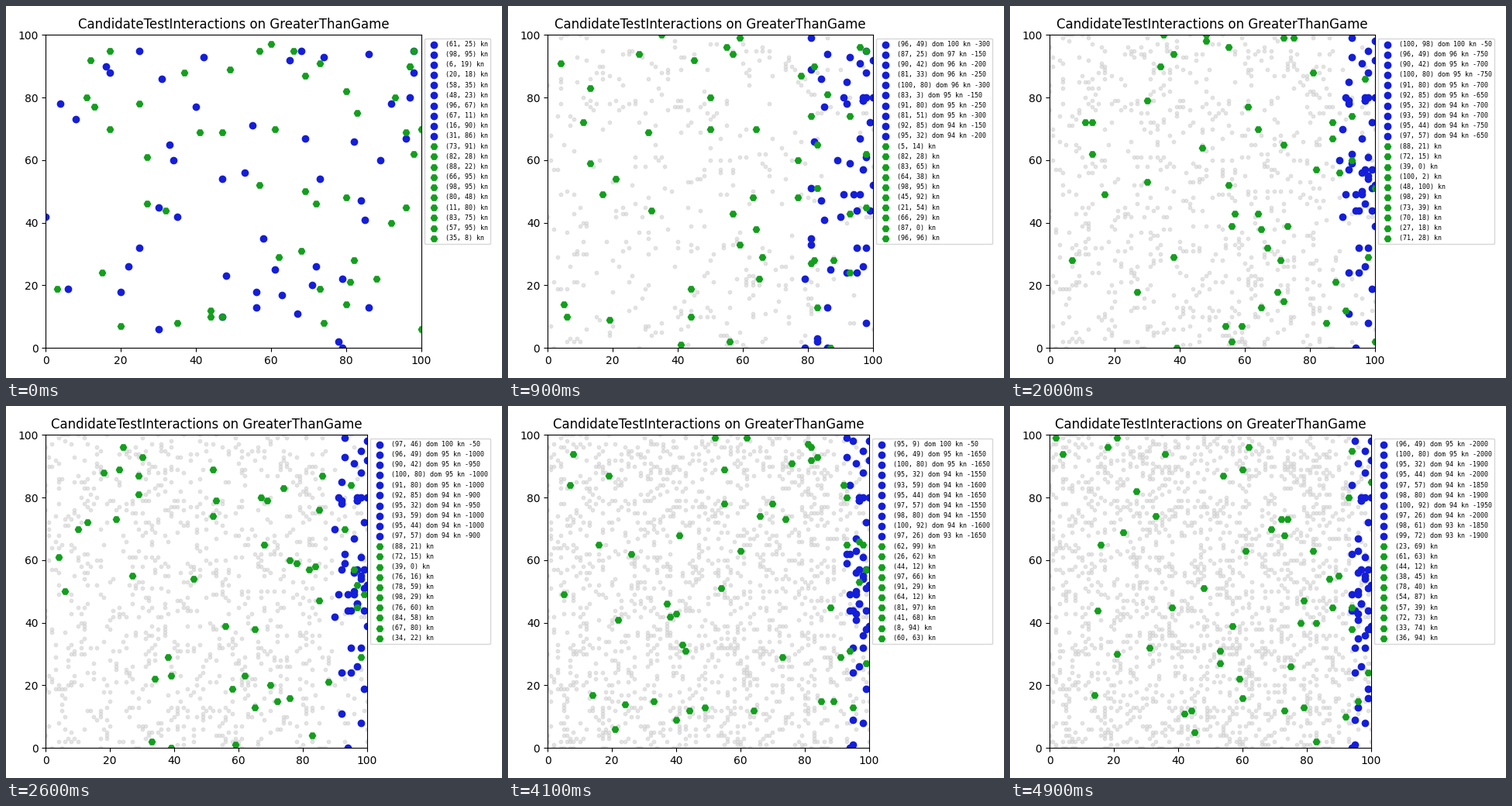
Animation, 640 px wide and 480 px high, one loop 5 s. Source, as a matplotlib script:

```python
import matplotlib.pyplot as plt
import numpy as np
from matplotlib.animation import FuncAnimation

FRAMES, INTERVAL = 50, 100
POPULATION, BOARD = 50, 10
BLUE, GREEN, GRAY = "#141ed8", "#149e1e", "0.8"

# Queue for the leaderboard: as weak leaders drop out, later ones move up.
CHAMPIONS = [(96, 49), (87, 25), (90, 42), (81, 33), (100, 80), (83, 3), (75, 60),
             (91, 80), (81, 51), (92, 85), (95, 32), (93, 59), (95, 44), (97, 57),
             (98, 80), (100, 92), (97, 26), (98, 61), (99, 72)]

rng = np.random.default_rng(12)


def point(low=0, high=100):
    return int(rng.integers(low, high + 1)), int(rng.integers(0, 101))


def bar(t):
    """Smallest x a candidate needs to survive generation t."""
    return int(100 - 100 * t ** -0.73)


def arrival(i):
    return 2 + 3 * i % 4


def dominance(rank, t):
    if rank == 0 and t < 45:
        return 100
    return round(96 - 0.18 * rank - t / 40 + 6 * np.exp(-t / 6) * (1 - rank / 9))


def next_candidates(candidates, t):
    """Survivors, then arriving champions, then random children above the bar."""
    alive = [p for p in candidates if p[0] >= bar(t)]
    alive += [p for i, p in enumerate(CHAMPIONS) if arrival(i) == t]
    while len(alive) < POPULATION:
        alive.append(point(bar(t)))
    return alive


def next_test(test):
    if rng.random() < 0.8:
        return test
    return int(101 * rng.random() ** 0.65), int(rng.integers(0, 101))


def reject(trail, t):
    """A failed child: either near an earlier one or anywhere below the bar."""
    if rng.random() < 0.3:
        near = trail[rng.integers(len(trail))] + rng.integers(-2, 3, 2)
        return tuple(int(v) for v in np.clip(near, 0, 100))
    return point(0, max(60, bar(t)))


def evolve():
    candidates = [point() for _ in range(POPULATION)]
    tests = [point() for _ in range(POPULATION)]
    trail = []
    history = [(candidates, tests, [])]
    for t in range(1, FRAMES):
        alive, kept = next_candidates(candidates, t), [next_test(p) for p in tests]
        trail += [p for p in candidates if p not in alive]
        trail += [p for p, q in zip(tests, kept) if p != q]
        trail += [reject(trail, t) for _ in range(28)]
        candidates, tests = alive, kept
        history.append((candidates, tests, sorted(set(trail))))
    return history


HISTORY = evolve()


def leader_labels(candidates, t):
    board = [(p, 0.85 * (t - arrival(i))) for i, p in enumerate(CHAMPIONS) if p[0] >= bar(t)]
    if 10 <= t < 45:
        board.insert(0, (candidates[-1], 1))  # the newest candidate leads
    return [f"({x}, {y}) dom {dominance(rank, t)} kn {-50 * max(1, round(wins))}"
            for rank, ((x, y), wins) in enumerate(board[:BOARD])]


def plain_labels(points):
    return [f"({x}, {y}) kn" for x, y in points[:BOARD]]


fig, ax = plt.subplots(figsize=(6.4, 4.8), dpi=100)


def dots(points, **style):
    return ax.scatter(*zip(*points), linewidths=1, **style)


def draw(t):
    ax.clear()
    candidates, tests, trail = HISTORY[t]
    if trail:
        dots(trail, s=10, color=GRAY, alpha=0.5)
    blue = dots(candidates, color=BLUE)
    green = dots(tests, color=GREEN, marker="H")

    labels = leader_labels(candidates, t) if t else plain_labels(candidates)
    ax.legend([blue] * BOARD + [green] * BOARD, labels + plain_labels(tests),
              loc="upper left", bbox_to_anchor=(1, 1),
              prop={"family": "DejaVu Sans Mono", "size": 6})
    ax.set_title("CandidateTestInteractions on GreaterThanGame")
    ax.set(xlim=(0, 100), ylim=(0, 100))
    fig.tight_layout()
    return []


animation = FuncAnimation(fig, draw, frames=FRAMES, interval=INTERVAL,
                          init_func=lambda: [], repeat=True, repeat_delay=0)
plt.show()
```
